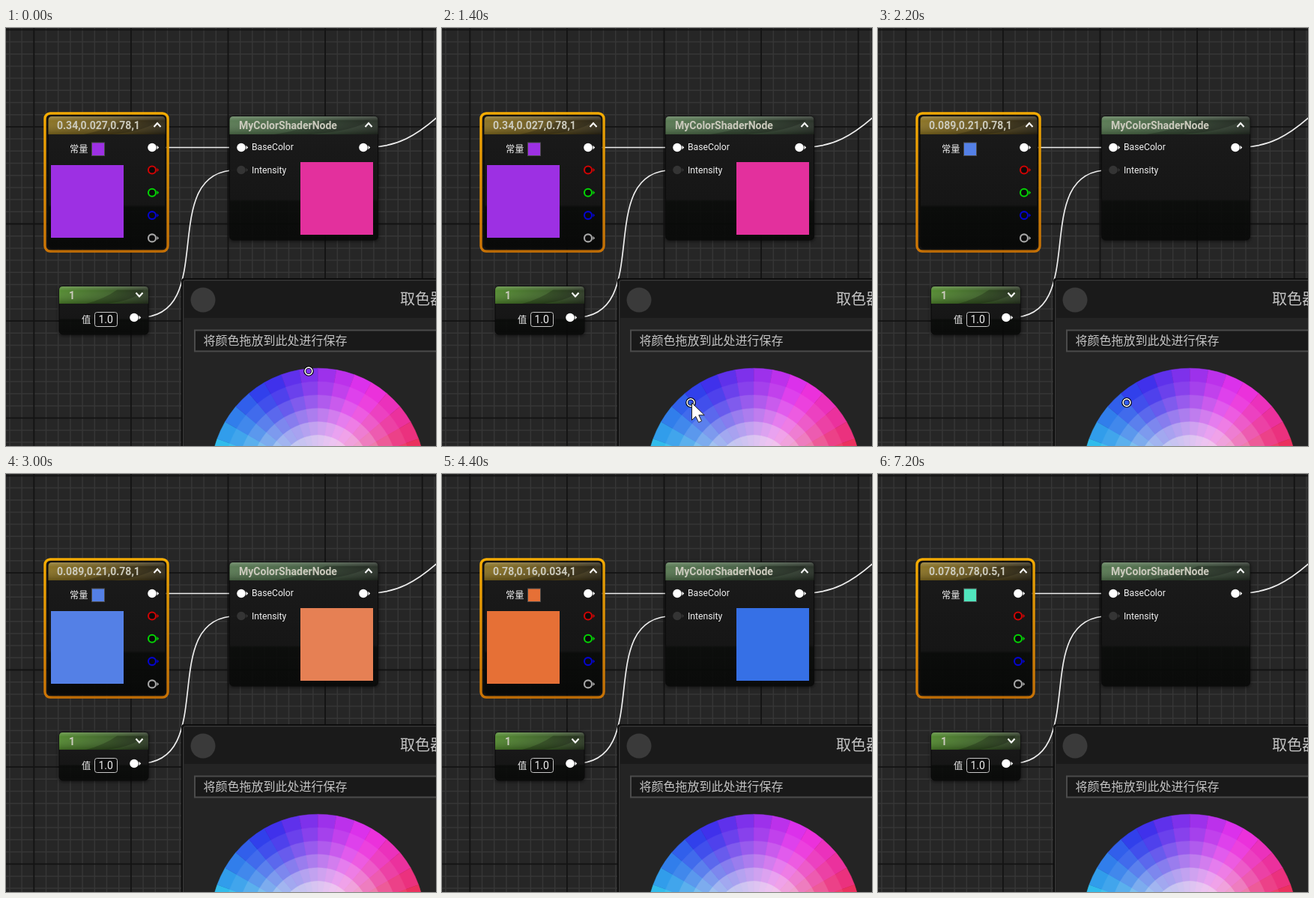
An HTML page that plays this animation: 574 by 558 pixels, repeating every 8 s.

```html
<!DOCTYPE html>
<html lang="zh">
<head>
<meta charset="utf-8">
<title>Colour node</title>
<style>
  html, body { margin: 0; width: 100%; height: 100%; overflow: hidden; background: #262626; }
  svg { display: block; width: 574px; height: 558px; }
  text { font-family: Roboto, "Noto Sans CJK SC", "Noto Sans CJK", sans-serif; fill: #f0f0f0; font-size: 12.2px; }
  .title { font-size: 14px; font-weight: 700; fill: #cbcabd; }
  .picker text { fill: #c4c4c4; }
  .wire { fill: none; stroke: #eee; stroke-width: 1.7; }
  .chevron { fill: none; stroke: #fff; stroke-width: 2; }
</style>
</head>
<body>
<svg id="stage" viewBox="0 0 574 558">
  <defs>
    <linearGradient id="body" x2="0" y2="1">
      <stop offset="0" stop-color="#1b1b1b" stop-opacity=".98"/>
      <stop offset=".67" stop-color="#161616" stop-opacity=".97"/>
      <stop offset=".69" stop-color="#0b0d0b" stop-opacity=".8"/>
      <stop offset="1" stop-color="#080908" stop-opacity=".82"/>
    </linearGradient>
    <linearGradient id="gold">
      <stop offset="0" stop-color="#89701f"/><stop offset=".5" stop-color="#65531c"/>
      <stop offset="1" stop-color="#2c2615"/>
    </linearGradient>
    <linearGradient id="sage">
      <stop offset="0" stop-color="#55774f"/><stop offset=".5" stop-color="#425c40"/>
      <stop offset="1" stop-color="#232b22"/>
    </linearGradient>
    <linearGradient id="green">
      <stop offset="0" stop-color="#4f872b"/><stop offset=".55" stop-color="#3b6125"/>
      <stop offset="1" stop-color="#27341f"/>
    </linearGradient>
    <linearGradient id="sheen" x2="0" y2="1">
      <stop offset="0" stop-color="#fff" stop-opacity=".22"/>
      <stop offset=".25" stop-color="#fff" stop-opacity=".04"/>
      <stop offset="1" stop-color="#000" stop-opacity=".25"/>
    </linearGradient>
    <linearGradient id="select" x2="0" y2="1">
      <stop offset="0" stop-color="#fbb004"/><stop offset="1" stop-color="#cf7606"/>
    </linearGradient>
    <filter id="shadow" x="-10%" y="-10%" width="120%" height="125%">
      <feGaussianBlur stdDeviation="2"/>
    </filter>
    <clipPath id="panel"><rect x="239" y="338" width="340" height="225"/></clipPath>
  </defs>
</svg>
<script>
const NS = 'http://www.w3.org/2000/svg';
const stage = document.getElementById('stage');

function add(parent, tag, attrs, text) {
  const el = document.createElementNS(NS, tag);
  for (const k in attrs) el.setAttribute(k, attrs[k]);
  if (text !== undefined) el.textContent = text;
  parent.appendChild(el);
  return el;
}
const group = (parent, attrs = {}) => add(parent, 'g', attrs);
const rect = (parent, x, y, width, height, attrs) => add(parent, 'rect', { x, y, width, height, ...attrs });
const circle = (parent, cx, cy, r, attrs) => add(parent, 'circle', { cx, cy, r, ...attrs });
const path = (parent, d, attrs) => add(parent, 'path', { d, ...attrs });
const label = (parent, x, y, str, attrs) => add(parent, 'text', { x, y, ...attrs }, str);
const show = (el, on) => el.setAttribute('visibility', on ? 'visible' : 'hidden');

function drawGrid() {
  const step = 16.2;
  let minor = '', major = '';
  for (let i = -2; i < 36; i++) {
    const x = 37.3 + i * step, y = 2.3 + i * step;
    const d = `M${x} 0V558`, e = `M0 ${y}H574`;
    if (i % 8 === 0) major += d + e; else minor += d + e;
  }
  rect(stage, 0, 0, 574, 558, { fill: '#262626' });
  path(stage, minor, { stroke: '#363636', 'stroke-width': 1.5 });
  path(stage, major, { stroke: '#131313', 'stroke-width': 1.8 });
}

// Draws the frame of a node and returns a function that sets its width.
function drawNode(x, y, w, h, head, color) {
  const g = group(stage);
  const d = (w) => `M${x} ${y + head}V${y + 5}q0 -5 5 -5H${x + w - 5}q5 0 5 5V${y + head}Z`;
  const shade = rect(g, x - 1, y - 1, w + 2, h + 3, { rx: 6, fill: '#000', opacity: .5, filter: 'url(#shadow)' });
  const base = rect(g, x, y, w, h, { rx: 5, fill: 'url(#body)', stroke: '#0a0a0a' });
  const tops = [color, 'sheen'].map(id => path(g, d(w), { fill: `url(#${id})` }));
  path(g, `M${x + w * .3} ${y + head}q${w * .2} ${-head * .25} ${w * .35} ${-head * .8}h${w * .3}q${-w * .1} ${head * .6} ${-w * .4} ${head * .8}Z`,
    { fill: '#000', opacity: .22 });
  return (w) => {
    shade.setAttribute('width', w + 2);
    base.setAttribute('width', w);
    tops.forEach(p => p.setAttribute('d', d(w)));
  };
}

function pin(parent, x, y, color, filled) {
  if (filled) circle(parent, x, y, 5.8, { fill: color });
  else circle(parent, x, y, 5, { fill: '#0b0b0b', stroke: color, 'stroke-width': 2.1 });
  path(parent, `M${x + 6.5} ${y - 2.7}l2.7 2.7l-2.7 2.7z`, { fill: color });
}

const chevron = (parent, x, y, dir) =>
  path(parent, `M${x - 4.5} ${y + 2.5 * dir}l4.5 ${-5 * dir}l4.5 ${5 * dir}`, { class: 'chevron' });

function hsv(h, s, v) {
  const f = n => {
    const k = (n + h / 60) % 6;
    return Math.round(v * (1 - s * Math.max(0, Math.min(k, 4 - k, 1))));
  };
  return `rgb(${f(5)},${f(3)},${f(1)})`;
}

function drawWheel(parent) {
  const cx = 416.3, cy = 597.2, R = 143, rings = 8, step = 10;
  const at = (r, a) => {
    const t = a * Math.PI / 180;
    return `${cx + r * Math.cos(t)} ${cy + r * Math.sin(t)}`;
  };
  for (let i = rings; i > 0; i--) {
    const r = R * i / rings, p = (i - .5) / rings, s = .8 * p * p * (3 - 2 * p);
    for (let a = 180; a < 360; a += step) {
      const fill = hsv(a + step / 2, s, 234 + 10 * (1 - p));
      path(parent, `M${cx} ${cy}L${at(r, a)}A${r} ${r} 0 0 1 ${at(r, a + step)}Z`,
        { fill, stroke: fill, 'stroke-width': .5 });
    }
  }
}

drawGrid();

path(stage, 'M203 159.5H312', { class: 'wire' });
path(stage, 'M177 386.5C287 386.5 198 189.5 309 189.5', { class: 'wire' });
path(stage, 'M485 159C521 159 548 144 579 116', { class: 'wire' });

// Colour constant
const outline = rect(stage, 52, 114, 164, 184,
  { rx: 7, fill: '#0c0c0c', 'fill-opacity': .6, stroke: 'url(#select)', 'stroke-width': 3.4 });
const setWidth = drawNode(56.5, 118, 156, 176, 24, 'gold');
const value = label(stage, 68, 135, '', { class: 'title' });
label(stage, 85, 166, '常量', { 'font-weight': 500 });
const swatch = rect(stage, 114.5, 153, 17, 17.5, { stroke: '#4c4c4c' });
const pins = group(stage);
chevron(pins, 202, 129.5, 1);
pin(pins, 195, 159.5, '#fff', true);
['#d00404', '#04d404', '#0404cc', '#a8a8a8'].forEach((c, i) => pin(pins, 195, 189.5 + i * 30.3, c));

// Shader node
drawNode(298.5, 118, 198, 165, 24, 'sage');
label(stage, 311, 135, 'MyColorShaderNode', { class: 'title' });
chevron(stage, 484, 129.5, 1);
pin(stage, 314, 159.5, '#fff', true);
pin(stage, 314, 189.5, '#343434', true);
pin(stage, 477, 159.5, '#fff', true);
label(stage, 328, 163, 'BaseColor');
label(stage, 328, 194, 'Intensity');

// Scalar constant
drawNode(71, 345, 119, 64, 23, 'green');
label(stage, 84, 362, '1', { class: 'title' });
chevron(stage, 178, 356, -1);
label(stage, 101, 393.5, '值', { 'font-weight': 500 });
rect(stage, 118.5, 379.5, 30, 19, { rx: 3, fill: '#0d0d0d', stroke: '#c8c8c8' });
label(stage, 123.5, 394, '1.0', { style: 'font-size:14px' });
pin(stage, 171, 386.5, '#fff', true);

const previews = group(stage);
const inputBox = rect(previews, 60, 183, 97, 97);
const outputBox = rect(previews, 393, 179, 97, 97);

// Colour picker
const picker = group(stage, { class: 'picker' });
rect(picker, 234, 334, 350, 240, { rx: 4, fill: '#0d0d0d' });
rect(picker, 236.5, 336.5, 350, 240, { rx: 3, fill: '#242424', stroke: '#393939' });
rect(picker, 238, 338, 340, 49, { fill: '#1a1a1a' });
circle(picker, 263, 363, 16.5, { fill: '#3a3a3a' });
label(picker, 526, 369, '取色器', { style: 'font-size:20px' });
rect(picker, 252, 403.5, 340, 28, { fill: '#191919', stroke: '#4b4b4b', 'stroke-width': 2 });
label(picker, 263.5, 423, '将颜色拖放到此处进行保存', { style: 'font-size:16px' });
drawWheel(group(picker, { 'clip-path': 'url(#panel)' }));

const marker = group(stage);
circle(marker, 0, 0, 5, { fill: 'none', stroke: '#000', 'stroke-width': 3.6 });
circle(marker, 0, 0, 4.8, { fill: 'none', stroke: '#fff', 'stroke-width': 1.7 });
const cursor = path(stage, 'M.5 .5V23.5L5.7 18.5L9.6 26.5L13.6 24.6L9.8 16.8H17.3Z',
  { fill: '#fff', stroke: '#222', 'stroke-width': 1 });

// Each track lists [start ms, ...values] and holds until the next entry.
const tracks = {
  cursor: [[0], [200, 348, 530], [400, 404, 489], [600, 398, 484], [800, 361, 484],
    [1000, 344, 490], [1200, 332, 500], [1400, 333, 500], [1600]],
  marker: [[0, 404, 458], [800, 365, 484], [1000, 347, 488], [1200, 332, 500], [3000]],
  value: [[0, '0.34,0.027,0.78,1', 156], [1600, '0.089,0.21,0.78,1', 156],
    [3600, '0.78,0.16,0.034,1', 156], [7200, '0.078,0.78,0.5,1', 148]],
  color: [[0, 157, 48, 227], [1600, 84, 128, 230], [3600, 230, 112, 54], [7000, 80, 229, 189]],
  preview: [[0, true], [1600, false], [2400, true], [3600, false], [4400, true], [7000, false]]
};
const pick = (name, t) => tracks[name].filter(k => k[0] <= t).pop().slice(1);

function place(el, pos) {
  show(el, pos.length > 0);
  if (pos.length) el.setAttribute('transform', `translate(${pos})`);
}

function update(t) {
  place(cursor, pick('cursor', t));
  place(marker, pick('marker', t));

  const [str, width] = pick('value', t);
  value.textContent = str;
  setWidth(width);
  outline.setAttribute('width', width + 8);
  pins.setAttribute('transform', `translate(${width - 156} 0)`);

  // The shader swaps the red and blue channels.
  const rgb = pick('color', t);
  const fill = `rgb(${rgb})`;
  swatch.setAttribute('fill', fill);
  inputBox.setAttribute('fill', fill);
  outputBox.setAttribute('fill', `rgb(${rgb.reverse()})`);
  show(previews, pick('preview', t)[0]);
}

const start = performance.now();
function tick() {
  update((performance.now() - start) % 8000);
  requestAnimationFrame(tick);
}
tick();
</script>
</body>
</html>
```
